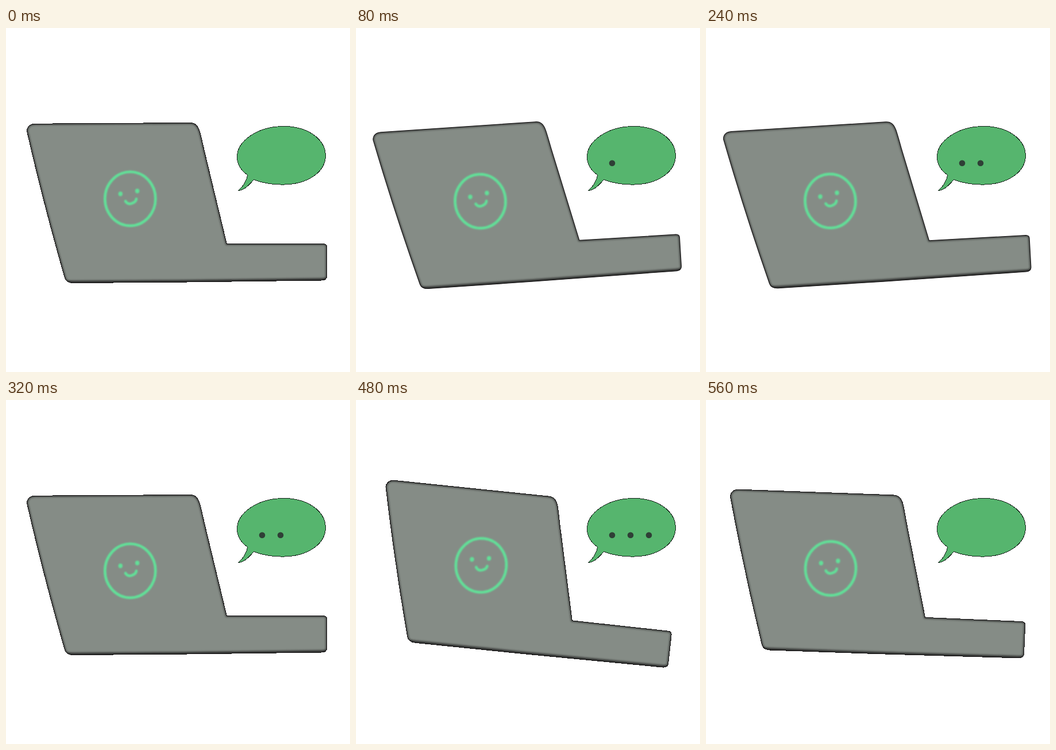
These frames come from a looping animation (599 by 600 pixels, 640 ms). An HTML page:

```html
<!DOCTYPE html>
<html lang="en">
<head>
<meta charset="utf-8">
<title>Rocking laptop</title>
<style>
html, body { margin: 0; width: 100%; height: 100%; overflow: hidden; background: #fff; }
svg { display: block; width: 100%; height: 100%; }
.hard { shape-rendering: crispEdges; }
</style>
</head>
<body>
<svg viewBox="0 0 599 600" fill="none" stroke-linecap="round" stroke-linejoin="round">
  <defs>
    <path id="shell" d="M36.500 180 C36.500 172 42 167.300 51 167.200 L320 165.500 C330 165.400 334.500 171 337.500 181 Q340 190 345 213 L384.300 376.500 H553 Q558.800 377 558.800 382 V433 Q558.300 439.700 550 440 L300 443.200 L117 444.500 Q105 444.400 102.500 436 Q66 309 36.500 180 Z"/>
    <clipPath id="inside"><use href="#shell"/></clipPath>
    <filter id="shade" filterUnits="userSpaceOnUse" x="0" y="120" width="599" height="360">
      <feGaussianBlur stdDeviation="1.5"/>
    </filter>
    <filter id="glow" filterUnits="userSpaceOnUse" x="150" y="230" width="135" height="135">
      <feGaussianBlur stdDeviation="1"/>
    </filter>
  </defs>

  <g id="laptop">
    <use class="hard" href="#shell" fill="#858c86"/>
    <g clip-path="url(#inside)" stroke="#1c1a1b">
      <use href="#shell" stroke-width="4" opacity=".7" filter="url(#shade)"/>
      <path d="M108 444.500 L300 443.200 L555 440" stroke-width="8" opacity=".6" filter="url(#shade)"/>
    </g>
    <use class="hard" href="#shell" stroke="#0f0d0e"/>
    <g stroke="#62df98" stroke-width="4.700" filter="url(#glow)">
      <ellipse cx="216.300" cy="297.800" rx="44" ry="47"/>
      <path d="M208 302 C211 307 216 307.500 220 305.500 Q226.500 303 227 298"/>
      <g fill="#62df98" stroke="none">
        <ellipse cx="199.300" cy="289.300" rx="3.700" ry="4.100"/>
        <ellipse cx="228.600" cy="284.300" rx="3.700" ry="4.100"/>
      </g>
    </g>
  </g>

  <path class="hard" fill="#56b56e" stroke="#122017" d="M431.500 264.500 C446 270 462 273.300 482 273.100 C524 273 556.800 252 556.300 222 C556 193 524 171.200 483 171.500 C438 171.700 402.400 197 402.400 225 C402.400 238 410 249 420.800 256.500 C419 267 412 277.500 404.500 283.500 C415 283 423 274 431.500 264.500 Z"/>
  <g id="dots" fill="#2f3f36">
    <circle cx="446" cy="235.800" r="5.300"/>
    <circle cx="478" cy="235.800" r="5.300"/>
    <circle cx="510" cy="235.800" r="5.300"/>
  </g>
</svg>
<script>
const STEP = 80;
const TILT = [0, -3.5, -7.2, -3.2, 0, 2.8, 6.26, 2.43];
const laptop = document.getElementById("laptop");
const dots = [...document.getElementById("dots").children];

function draw(ms) {
  const pose = Math.floor(ms / STEP) % TILT.length;
  const angle = TILT[pose];
  const nudge = angle ? "translate(.4 -.7) " : "";
  laptop.setAttribute("transform", `${nudge}rotate(${angle} 297.5 304)`);

  // One more dot every two steps, then a blank pause across the loop point.
  const count = Math.floor((pose + 1) / 2) % 4;
  dots.forEach((dot, i) => dot.setAttribute("visibility", i < count ? "visible" : "hidden"));
}

const start = performance.now();
function tick() {
  draw(performance.now() - start);
  requestAnimationFrame(tick);
}
tick();
</script>
</body>
</html>
```
